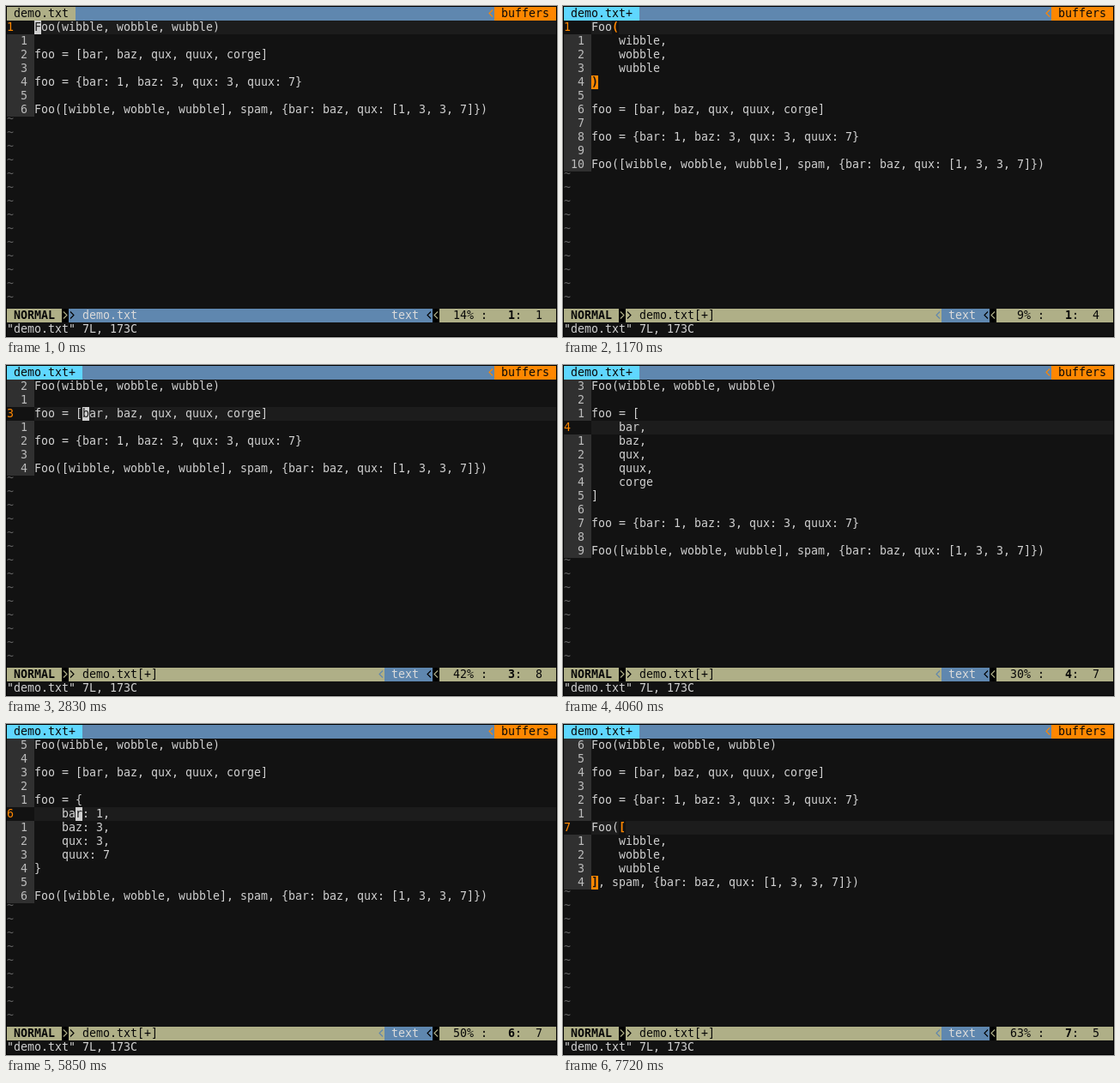
Recreate the animation shown at these times as an HTML page with a canvas. Size 642 by 386 pixels, loop 8 s.

```html
<!DOCTYPE html>
<html lang="en">
<head>
<meta charset="utf-8">
<title>demo.txt</title>
<style>
html, body { margin: 0; width: 100%; height: 100%; overflow: hidden; background: #000; }
canvas { display: block; }
</style>
</head>
<body>
<canvas id="screen" width="642" height="386"></canvas>
<script>
const ctx = document.getElementById('screen').getContext('2d');
const CW = 8, CH = 16, PAD = 1, COLS = 80, TEXT_ROWS = 21, GUTTER = 4;
const LOOP = 8000;
const FACE = '13.29px "DejaVu Sans Mono", "Noto Sans Mono", monospace';

const C = {
  bg: '#121212', line: '#1c1c1c', fg: '#d0d0d0', gutter: '#303030', num: '#bcbcbc',
  orange: '#ff8700', tilde: '#5f5f5f', khaki: '#afaf87', blue: '#5f87af',
  cyan: '#5fd7ff', ink: '#080808', black: '#000000', pale: '#dadada'
};

const joined = [
  'Foo(wibble, wobble, wubble)',
  '',
  'foo = [bar, baz, qux, quux, corge]',
  '',
  'foo = {bar: 1, baz: 3, qux: 3, quux: 7}',
  '',
  'Foo([wibble, wobble, wubble], spam, {bar: baz, qux: [1, 3, 3, 7]})'
];

// Break the bracket opening at column `open` of one line over several lines.
function split(row, open, close) {
  const text = joined[row];
  const items = text.slice(open, close).split(', ');
  const parts = items.map((s, i) => '    ' + s + (i < items.length - 1 ? ',' : ''));
  return [
    ...joined.slice(0, row),
    text.slice(0, open), ...parts, text.slice(close),
    ...joined.slice(row + 1)
  ];
}

const call = split(0, 4, 26);
const list = split(2, 7, 33);
const dict = split(4, 7, 38);
const nested = split(6, 5, 27);

// start time, buffer, cursor line, cursor column, cursor hidden
const steps = [
  [0, joined, 1, 1],
  [380, joined, 1, 4],
  [630, joined, 1, 5],
  [1170, call, 1, 4],
  [1500, call, 2, 4],
  [1890, call, 2, 4, true],
  [1990, joined, 2, 1],
  [2190, joined, 3, 1],
  [2510, joined, 3, 5],
  [2680, joined, 3, 7],
  [2830, joined, 3, 8],
  [3330, list, 3, 7],
  [3660, list, 4, 7],
  [4060, list, 4, 7, true],
  [4160, joined, 4, 1],
  [4480, joined, 5, 1],
  [4700, joined, 5, 5],
  [4870, joined, 5, 7],
  [5010, joined, 5, 8],
  [5440, dict, 5, 7],
  [5850, dict, 6, 7],
  [6210, dict, 6, 7, true],
  [6310, joined, 6, 1],
  [6590, joined, 7, 1],
  [6800, joined, 7, 4],
  [7030, joined, 7, 6],
  [7720, nested, 7, 5]
];
const FIRST_EDIT = 1170;

const px = col => PAD + col * CW;
const py = row => PAD + row * CH;

function fill(col, row, count, color) {
  ctx.fillStyle = color;
  ctx.fillRect(px(col), py(row), count * CW, CH);
}

function put(col, row, text, color, bold, lift = 0) {
  ctx.font = (bold ? 'bold ' : '') + FACE;
  ctx.fillStyle = color;
  [...text].forEach((ch, i) => {
    if (ch !== ' ') ctx.fillText(ch, px(col + i), py(row) + 12 - lift);
  });
}

function label(col, row, text, color, back, bold) {
  fill(col, row, text.length, back);
  put(col, row, text, color, bold);
}

function chevron(col, row, dir, color, back) {
  fill(col, row, 1, back);
  const x = px(col) + 4, y = py(row) + 7.5;
  ctx.strokeStyle = color;
  ctx.lineWidth = 1.1;
  ctx.beginPath();
  ctx.moveTo(x - 2 * dir, y - 4);
  ctx.lineTo(x + 2 * dir, y);
  ctx.lineTo(x - 2 * dir, y + 4);
  ctx.stroke();
}

function findMatch(lines, row, col) {
  const open = lines[row][col];
  const close = { '(': ')', '[': ']', '{': '}' }[open];
  if (!close) return null;
  let depth = 0;
  for (let r = row; r < lines.length; r++) {
    for (let c = r === row ? col : 0; c < lines[r].length; c++) {
      if (lines[r][c] === open) depth++;
      if (lines[r][c] === close && --depth === 0) return [r, c];
    }
  }
  return null;
}

function drawTabs(edited) {
  fill(0, 0, COLS, C.blue);
  label(0, 0, edited ? ' demo.txt+ ' : ' demo.txt ', C.ink, edited ? C.cyan : C.khaki);
  chevron(70, 0, -1, C.orange, C.blue);
  label(71, 0, ' buffers ', C.ink, C.orange);
}

function drawText(lines, line, col, hidden) {
  const cur = line - 1;
  for (let r = 0; r < TEXT_ROWS; r++) {
    const y = r + 1;
    if (r >= lines.length) {
      put(0, y, '~', C.tilde, false, 5);
      continue;
    }
    if (r === cur) {
      fill(GUTTER, y, COLS - GUTTER, C.line);
      put(0, y, String(line), C.orange);
    } else {
      label(0, y, String(Math.abs(r - cur)).padStart(3) + ' ', C.num, C.gutter);
    }
    put(GUTTER, y, lines[r], C.fg);
  }
  if (hidden) return;

  const ch = lines[cur][col - 1] || ' ';
  const match = findMatch(lines, cur, col - 1);
  if (match) {
    const [r, c] = match;
    label(GUTTER + col - 1, line, ch, C.orange, C.bg, true);
    label(GUTTER + c, r + 1, lines[r][c], C.bg, C.orange, true);
  } else {
    label(GUTTER + col - 1, line, ch, C.line, C.fg);
  }
}

function drawStatus(edited, total, line, col) {
  const y = 22;
  const mid = edited ? C.khaki : C.blue;
  fill(0, y, COLS, mid);
  label(0, y, ' NORMAL ', C.ink, C.khaki, true);
  chevron(8, y, 1, C.khaki, C.black);
  chevron(9, y, 1, C.black, mid);
  put(11, y, edited ? 'demo.txt[+]' : 'demo.txt', edited ? C.ink : C.pale);

  if (edited) chevron(54, y, -1, C.blue, C.khaki);
  label(55, y, ' text ', C.pale, C.blue);
  chevron(61, y, -1, C.black, C.blue);
  chevron(62, y, -1, C.khaki, C.black);

  fill(63, y, COLS - 63, C.khaki);
  const percent = Math.floor(line / total * 100);
  put(64, y, String(percent).padStart(3) + '% :', C.ink);
  put(70, y, String(line).padStart(4), C.ink, true);
  put(74, y, ':' + String(col).padStart(3), C.ink);
}

function draw(time) {
  const [, lines, line, col, hidden] = steps.findLast(s => s[0] <= time);
  const edited = time >= FIRST_EDIT;
  ctx.fillStyle = C.black;
  ctx.fillRect(0, 0, 642, 386);
  fill(0, 0, COLS, C.bg);
  ctx.fillStyle = C.bg;
  ctx.fillRect(PAD, PAD, COLS * CW, 24 * CH);
  drawTabs(edited);
  drawText(lines, line, col, hidden);
  drawStatus(edited, lines.length, line, col);
  put(0, 23, '"demo.txt" 7L, 173C', C.fg);
}

const start = performance.now();
function tick() {
  draw((performance.now() - start) % LOOP);
  requestAnimationFrame(tick);
}
tick();
</script>
</body>
</html>
```
